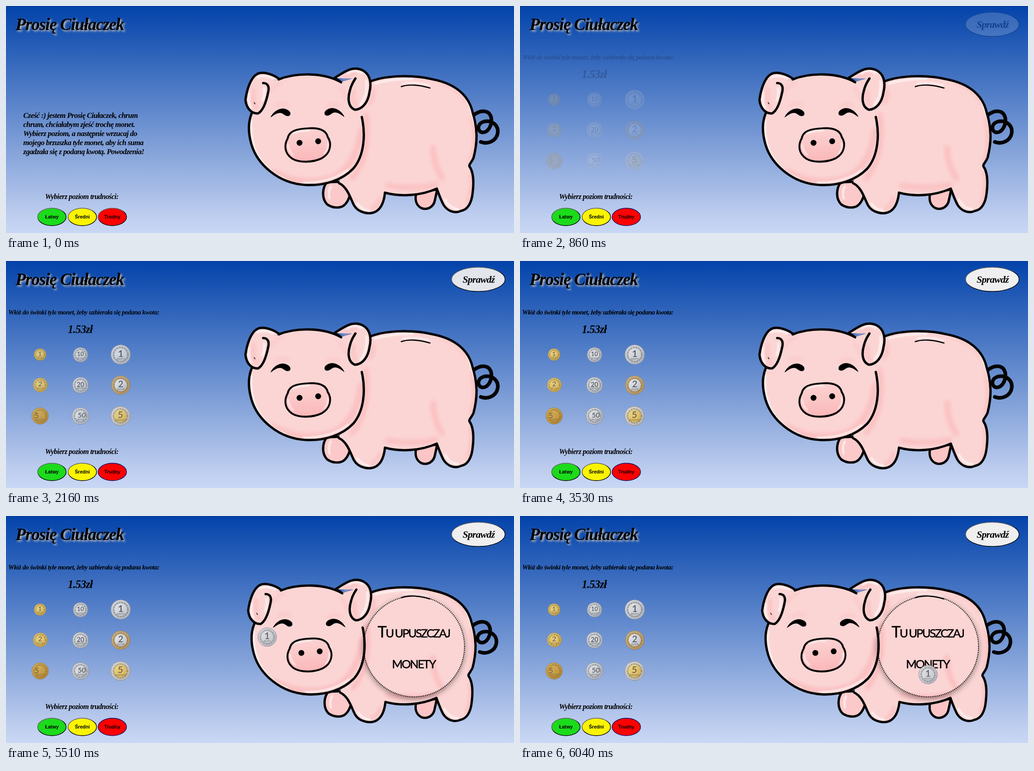
These frames come from a looping animation (1118x501 px, 8000 ms). An HTML page:

```html
<!DOCTYPE html>
<html lang="pl">
<head>
<meta charset="utf-8">
<title>Prosię Ciułaczek</title>
<style>
html, body { margin: 0; width: 100%; height: 100%; overflow: hidden; }
svg { display: block; width: 1118px; height: 501px; }
.script { font-family: "Liberation Serif", "Times New Roman", serif; font-weight: bold; font-style: italic; letter-spacing: -.034em; }
.title { font-size: 37.4px; text-shadow: 3px 3px 4px #c9c4bb; }
.btn { font: bold 10.6px "Liberation Sans", Arial, sans-serif; text-anchor: middle; }
.drop { font: 25.5px Lato, sans-serif; letter-spacing: -2.4px; text-anchor: middle; stroke: #000; stroke-width: .5px; }
.coin text { font-family: Lato, "Open Sans", sans-serif; text-anchor: middle; }
.ink { fill: none; stroke: #050303; stroke-width: 5.2; stroke-linecap: round; stroke-linejoin: round; }
.skin { fill: #fbd5d4; }
.rose { fill: none; stroke: #fbbabb; stroke-linecap: round; stroke-opacity: .75; filter: url(#soft); }
.shine { fill: none; stroke: #fff; stroke-width: 4; stroke-linecap: round; stroke-opacity: .75; filter: url(#haze); }
</style>
</head>
<body>
<svg viewBox="0 0 1118 501">
  <defs>
    <linearGradient id="sky" x2="0" y2="1">
      <stop stop-color="#0343aa"/><stop offset=".94" stop-color="#c1d0f0"/><stop offset="1" stop-color="#c9d7f5"/>
    </linearGradient>
    <linearGradient id="rim" x2=".6" y2="1">
      <stop stop-color="#6c6c6c"/><stop offset=".45" stop-color="#555"/><stop offset=".6" stop-color="#000"/>
    </linearGradient>
    <linearGradient id="snoutFill" x2=".1" y2="1">
      <stop stop-color="#fbd3d2"/><stop offset=".45" stop-color="#fbc8c8"/><stop offset="1" stop-color="#fbb8ba"/>
    </linearGradient>
    <linearGradient id="gold" x2="1" y2="1"><stop stop-color="#eedb8e"/><stop offset="1" stop-color="#d0ac4c"/></linearGradient>
    <linearGradient id="brass" x2="1" y2="1"><stop stop-color="#dfbc63"/><stop offset="1" stop-color="#b58631"/></linearGradient>
    <linearGradient id="silver" x2="1" y2="1"><stop stop-color="#e9ebee"/><stop offset="1" stop-color="#b8bcc3"/></linearGradient>
    <linearGradient id="tan" x2="1" y2="1"><stop stop-color="#d4bd94"/><stop offset="1" stop-color="#b79463"/></linearGradient>
    <filter id="soft" x="-50%" y="-50%" width="200%" height="200%"><feGaussianBlur stdDeviation="4"/></filter>
    <filter id="haze" x="-50%" y="-50%" width="200%" height="200%"><feGaussianBlur stdDeviation="1.5"/></filter>
    <filter id="shadow" x="-20%" y="-20%" width="140%" height="140%"><feGaussianBlur stdDeviation="7"/></filter>
    <mask id="outside">
      <rect x="740" y="130" width="320" height="320" fill="#fff"/><circle cx="898" cy="288" r="111.5"/>
    </mask>
    <path id="body" d="M803 166C840 152 900 152 940 162C990 172 1019 198 1027 235C1038 270 1038 300 1029 335C1025 345 1018 350 1020 354C1029 367 1030 388 1027 412C1025 433 1017 449 1002 452C987 459 971 452 963 439C957 428 953 416 948 403C915 418 870 422 834 412C832 432 826 446 815 453C800 462 775 456 766 440C758 425 752 400 733 391"/>
    <path id="head" d="M541 236C533 255 532 277 540 305C553 350 600 392 660 395C700 397 740 385 765 358C788 330 792 285 783 240L762 200L769 158L737 168C700 147 640 146 600 162L566 168L570 200Z"/>
    <path id="earL" d="M601 161C590 152 566 143 553 150C538 158 530 185 527 207C529 227 541 238 555 237C567 230 573 210 577 190C580 178 576 170 566 170"/>
    <path id="earR" d="M723 159C745 145 763 131 785 142C801 150 805 170 800 190C797 212 785 228 768 229C752 223 752 202 757 186C760 173 765 166 769 160"/>
    <path id="eye" d="M582 246C588 232 606 221 619 229C628 233 628 242 621 243C614 244 610 236 603 236C595 236 589 242 582 246Z"/>
    <clipPath id="inBody"><use href="#body"/></clipPath>
    <clipPath id="inHead"><use href="#head"/></clipPath>
  </defs>

  <rect width="1118" height="501" fill="url(#sky)"/>
  <rect width="1118" height="1" fill="#0b3684"/>
  <text class="script title" x="21" y="53">Prosię Ciułaczek</text>

  <g id="pig">
    <path class="ink" style="stroke-width:8" d="M1029 241C1045 228 1064 229 1068 247C1070 265 1060 280 1048 279C1036 276 1037 259 1052 255C1070 251 1085 264 1082 281C1079 298 1060 306 1045 300"/>
    <g class="skin">
      <path class="ink" style="fill:#fbc9c9" d="M706 389C696 402 694 425 707 438C720 447 738 447 746 438C754 430 757 418 760 405L735 388Z"/>
      <path class="ink" style="fill:#fbc5c5" d="M903 412C899 428 903 440 914 446C930 452 942 441 944 428L949 405Z"/>
      <path d="M712 425Q708 410 715 398" class="shine"/>
      <use href="#body"/>
      <path d="M803 166L733 391L760 260Z"/>
    </g>
    <g clip-path="url(#inBody)">
      <path class="rose" stroke-width="12" d="M792 240Q803 330 762 380M840 396Q895 406 946 394"/>
      <path class="rose" stroke-width="13" d="M940 313Q940 350 960 380"/>
      <path class="rose" stroke-width="8" d="M807 185Q812 200 800 215M1026 250Q1036 300 1024 340M1024 370Q1028 400 1017 435M822 425Q819 440 805 448"/>
      <path class="rose" stroke-width="9" d="M960 170Q1003 184 1015 215" opacity=".6"/>
      <path class="shine" d="M812 171Q850 160 895 161M1015 210Q1028 232 1031 260M773 435Q783 450 799 452M966 427Q977 448 995 448"/>
    </g>
    <use href="#body" class="ink"/>
    <path class="shine" style="stroke-width:3" d="M874 171Q900 166 931 175"/>
    <path class="ink" style="stroke-width:2.6" d="M870 178C885 172 910 174 933 181"/>

    <use href="#head" class="skin"/>
    <g clip-path="url(#inHead)">
      <path class="rose" stroke-width="14" d="M588 366Q655 402 725 376Q773 347 781 275"/>
      <path class="rose" stroke-width="7" opacity=".55" d="M595 220Q607 210 621 218M706 222Q718 213 732 219M580 190Q590 175 605 170M735 180Q745 190 748 204"/>
      <path class="shine" d="M540 253Q537 292 552 326Q572 366 615 382M655 390Q714 390 752 362"/>
    </g>
    <path class="ink" d="M541 236C533 255 532 277 540 305C553 350 600 392 660 395C700 397 740 385 765 358C788 330 792 285 783 245M600 162C640 146 700 147 737 168"/>

    <use href="#earL" class="skin"/>
    <path class="rose" stroke-width="8" d="M545 185Q541 215 553 226"/>
    <path class="shine" d="M535 192Q532 212 539 224M553 157Q572 151 588 160M568 181Q570 193 565 208"/>
    <use href="#earL" class="ink"/>
    <path class="ink" style="stroke-width:1.5" d="M546 213l2 3"/>
    <use href="#earR" class="skin"/>
    <path class="rose" stroke-width="8" d="M745 160Q758 150 770 148M765 188Q762 207 770 219"/>
    <path class="shine" d="M793 166Q797 195 780 218M752 149Q767 138 783 148"/>
    <use href="#earR" class="ink"/>
    <path class="ink" style="stroke-width:4" d="M723 159Q732 162 738 169"/>

    <use href="#eye"/>
    <use href="#eye" transform="translate(1327 -1) scale(-1 1)"/>
    <path class="ink" style="fill:url(#snoutFill);stroke-width:4.2" d="M620 292C623 274 645 271 665 270C690 268 705 275 708 289C718 304 714 325 695 336C675 346 645 346 630 337C612 325 612 306 620 292Z"/>
    <path class="shine" style="stroke-width:3" d="M631 281Q650 274 668 275M621 306Q622 320 632 329M708 302Q711 315 701 326"/>
    <circle cx="646" cy="302" r="6.5"/><circle cx="687" cy="298.5" r="6.5"/>
  </g>

  <g id="hello" class="script" font-size="16.6"></g>
  <text class="script" x="86" y="426" font-size="16">Wybierz poziom trudności:</text>
  <g id="levels"></g>

  <g id="game">
    <text class="script" x="5" y="118" font-size="14.6">Włóż do świnki tyle monet, żeby uzbierała się podana kwota:</text>
    <text class="script" x="136" y="159" font-size="24.6">1.53zł</text>
    <g id="coins"></g>
    <ellipse cx="1039.5" cy="40.5" rx="58.8" ry="26.8" fill="#efefef" stroke="url(#rim)" stroke-width="1.4"/>
    <text class="script" x="1005" y="48" font-size="21.6">Sprawdź</text>
  </g>

  <g id="target">
    <circle cx="898" cy="292" r="111" opacity=".45" filter="url(#shadow)" mask="url(#outside)"/>
    <circle cx="898" cy="288" r="111" fill="none" stroke="#000" stroke-width="2" stroke-dasharray="2 2"/>
    <g id="prompt" class="drop">
      <text x="897" y="268"><tspan font-size="34">T</tspan>U UPUSZCZAJ</text>
      <text x="897" y="336">MONETY</text>
    </g>
  </g>
  <g id="drag" opacity=".92"></g>
</svg>
<script>
const el = id => document.getElementById(id);
const LOOP = 8000, CLICK = 500, FADE = 2300, GRAB = 5060, PROMPT = 5140;

// time, x, y of the dragged coin
const PATH = [
  [5060, 252, 206], [5140, 300, 226], [5230, 378, 249], [5370, 462, 252],
  [5510, 574, 267], [5700, 735, 303], [5860, 850, 336], [6040, 898, 350]
];

el('hello').innerHTML = [
  'Cześć :) jestem Prosię Ciułaczek, chrum',
  'chrum, chciałabym zjeść trochę monet.',
  'Wybierz poziom, a następnie wrzucaj do',
  'mojego brzuszka tyle monet, aby ich suma',
  'zgadzała się z podaną kwotą. Powodzenia!'
].map((line, i) => `<text x="38" y="${247 + i * 20}">${line}</text>`).join('');

el('levels').innerHTML = [
  ['Łatwy', 101, '#1bdb1b'], ['Średni', 168, '#fbf400'], ['Trudny', 234, '#ff0000']
].map(([name, x, fill]) =>
  `<ellipse cx="${x}" cy="465.5" rx="31.3" ry="19.2" fill="${fill}" stroke="url(#rim)" stroke-width="1.4"/>
   <text class="btn" x="${x}" y="469">${name}</text>`).join('');
const hard = el('levels').querySelector('ellipse:last-of-type');

function coin(x, y, r, num, unit, metal, core, dx = 0) {
  const ink = metal === 'silver' && !core ? '#595e66' : '#80642f';
  const digit = core === 'silver' ? '#5c616a' : ink;
  const ring = (k, extra) => `<circle r="${r * k}" fill="none" stroke="${ink}" ${extra}/>`;
  const size = r * (num.length > 1 ? .8 : .95);
  return `<g class="coin" transform="translate(${x} ${y})">
    <circle r="${r}" fill="url(#${metal})"/>
    ${ring(.97, 'stroke-width="1" opacity=".75"')}
    ${core ? `<circle r="${r * .65}" fill="url(#${core})"/>` : ''}
    ${ring(.71, `stroke-width="${r * .15}" stroke-dasharray="2.4 1 1.2 1.2" opacity=".65"`)}
    ${ring(.84, 'stroke-width=".8" opacity=".45"')}
    <g font-size="${size}" font-weight="bold">
      <text x="${dx + .7}" y="${size * .26 + .7}" fill="#fff" opacity=".8">${num}</text>
      <text x="${dx}" y="${size * .26}" fill="${digit}">${num}</text>
    </g>
    <text y="${r * .52}" font-size="${r * .26}" fill="${digit}">${unit}</text>
  </g>`;
}

el('coins').innerHTML = [
  [75, 206.5, 13.5, '1', 'GROSZ', 'gold'],
  [164, 207, 16.5, '10', 'GROSZY', 'silver'],
  [252.5, 206.5, 22, '1', 'ZŁOTY', 'silver'],
  [75.5, 273.5, 16, '2', 'GROSZE', 'gold'],
  [164, 274, 18, '20', 'GROSZY', 'silver'],
  [252.5, 274, 21, '2', 'ZŁOTE', 'tan', 'silver'],
  [75, 342, 18.5, '5', 'GROSZY', 'brass', '', -7],
  [164, 342, 19, '50', 'GROSZY', 'silver', '', 3],
  [252, 342, 21.5, '5', 'ZŁOTYCH', 'silver', 'gold']
].map(c => coin(...c)).join('');
el('drag').innerHTML = coin(0, 0, 21, '1', 'ZŁOTY', 'silver');

const fade = el('game').animate({ opacity: [0, 1] }, { duration: FADE, easing: 'ease', fill: 'both' });
fade.pause();

function along(t) {
  const i = PATH.findIndex(p => p[0] > t);
  if (i < 0) return PATH[PATH.length - 1].slice(1);
  const [t0, x0, y0] = PATH[Math.max(i - 1, 0)], [t1, x1, y1] = PATH[i];
  const k = t1 > t0 ? (t - t0) / (t1 - t0) : 0;
  return [x0 + (x1 - x0) * k, y0 + (y1 - y0) * k];
}

const show = (id, on) => el(id).setAttribute('visibility', on ? 'visible' : 'hidden');

function draw(t) {
  const held = t >= GRAB;
  show('hello', t < CLICK);
  fade.currentTime = Math.min(Math.max(t - CLICK, 0), FADE);
  hard.setAttribute('stroke', t < CLICK ? 'url(#rim)' : '#10106e');
  el('pig').setAttribute('transform', held ? 'translate(899 310) scale(.984) translate(-899 -310)' : '');
  show('target', held);
  show('prompt', t >= PROMPT);
  show('drag', held);
  el('drag').setAttribute('transform', `translate(${along(t).join(' ')})`);
}

const start = performance.now();
function tick() {
  draw((performance.now() - start) % LOOP);
  requestAnimationFrame(tick);
}
tick();
</script>
</body>
</html>
```
